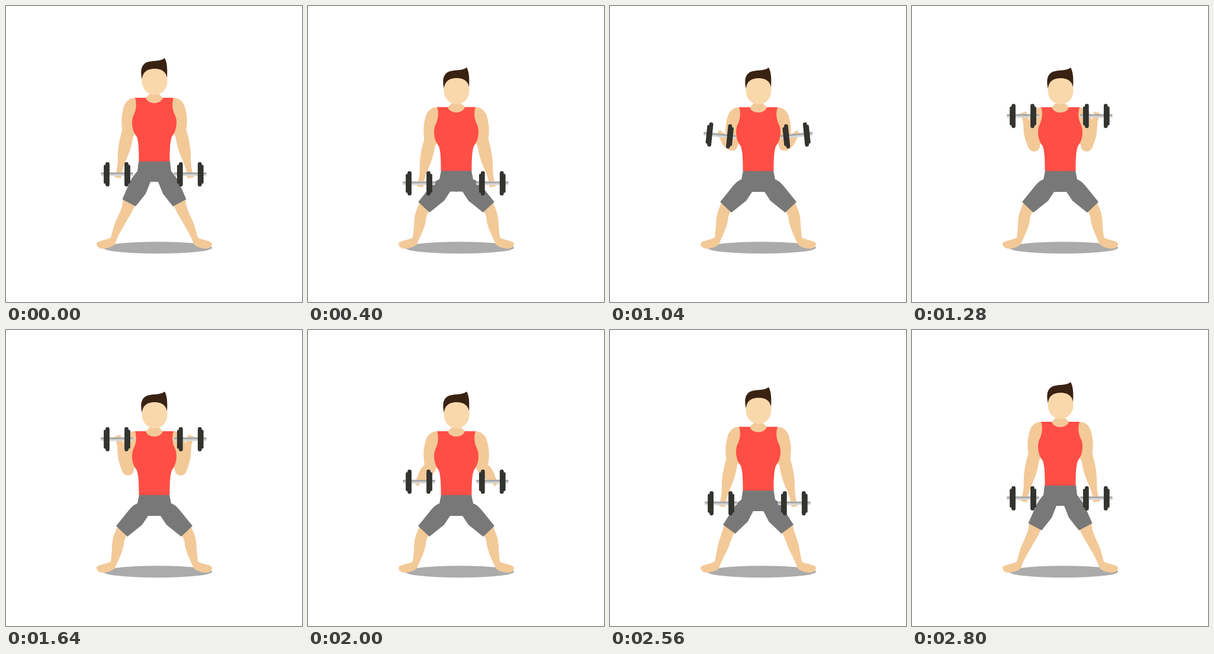
Write an HTML page with a canvas that moves like this. It is 500 px wide and 500 px high and loops after 3000 ms.

```html
<!DOCTYPE html>
<html lang="en">
<head>
<meta charset="utf-8">
<title>Squat and curl</title>
<style>
  html, body { margin: 0; width: 100%; height: 100%; overflow: hidden; background: #fff; }
  canvas { display: block; width: 500px; height: 500px; }
</style>
</head>
<body>
<canvas id="stage" width="500" height="500"></canvas>
<script>
const ctx = document.getElementById('stage').getContext('2d');
const LOOP = 3000, STEP = 40, SQUAT = 16;
const BODY_AXIS = 250.5, GRIP_AXIS = 249.4;
const SKIN = '#f3c998', FACE = '#f9d8ac', SHIRT = '#ff4e46', SHORTS = '#787878',
      HAIR = '#3a2213', PLATE = '#33332f', SHADOW = '#ababab';

// Left halves; the right halves are mirrored. Pairs are [standing, squatting].
const FOOT = 'L177 391 C170 396 153 396 153 402 C154 410 163 411 170 409 C180 407 184 403 185 400 ';
const LEG = [
  'M198 325 C197 345 188 355 183 370 ' + FOOT + 'C187 390 199 372 206 359 C212 350 214 345 218 336Z',
  'M189 331 C181 348 179 355 179 372 ' + FOOT + 'C188 392 196 378 199 363 C199 356 201 352 204 346Z'
];
const THIGH = [
  'M224 262 L222 279 C217 284 211 293 208 300 L196.500 326.500 L219 338.500 L236 317 L244 297 L252 297 L252 262Z',
  'M225 278 L222 293 C216 295 212 299 207 305 L186 331 L205 349 L230 329 L240 314 L252 314 L252 278Z'
];
const UPPER_ARM = 'M219 155 C206 155 200 164 198 174 C194 188 195 201 197 212 L216 219 L224 205 L224 155Z';
const TORSO = 'M218 155 C221 164 220 174 217 181 C214 187 213 191 213 196 C213 208 216 214 221 221 C224 230 224.500 242 224.500 262.800 L252 262.800 L252 155Z';
const NECK = 'M244 146 L243 148.500 L236 155 C238 161 244 164 251 164 L252 164 L252 146Z';
const HAIR_SHAPE = 'M229.500 123 C227 110 228 101 236 96 C245 91 259 95 268 88 C272 95 273 105 272 123Z';
const FACE_SHAPE = 'M229.500 127 C229.500 112 238 106 251 106 C264 106 272.500 112 272.500 127 C272.500 140 263 150 251 150 C239 150 229.500 140 229.500 127Z';

const clamp = x => Math.min(1, Math.max(0, x));
const lerp = (a, b, k) => a + (b - a) * k;
const span = (t, a, b) => clamp((t - a) / (b - a));
const smooth = x => x * x * (3 - 2 * x);

function morph([a, b], k) {
  const ends = b.match(/[\d.]+/g);
  let i = 0;
  return a.replace(/[\d.]+/g, n => lerp(+n, +ends[i++], k).toFixed(3));
}

function fill(path, color) {
  ctx.fillStyle = color;
  ctx.fill(new Path2D(path));
}

function ellipse(x, y, rx, ry, color) {
  ctx.fillStyle = color;
  ctx.beginPath();
  ctx.ellipse(x, y, rx, ry, 0, 0, 7);
  ctx.fill();
}

function shifted(dy, draw) {
  ctx.save();
  ctx.translate(0, dy);
  draw();
  ctx.restore();
}

function bothSides(axis, draw) {
  draw(false);
  ctx.save();
  ctx.translate(2 * axis, 0);
  ctx.scale(-1, 1);
  draw(true);
  ctx.restore();
}

function forearm(ex, ey, hx, hy) {
  const len = Math.hypot(hx - ex, hy - ey);
  ctx.save();
  ctx.translate(ex, ey);
  ctx.rotate(Math.atan2(hy - ey, hx - ex));
  const u = k => (k * len).toFixed(2);
  fill(`M0 -10 C${u(.3)} -11.500 ${u(.42)} -10 ${u(.6)} -7.200 C${u(.72)} -5 ${u(.85)} -4 ${u(1)} -5.500
        L${u(1)} 5.500 C${u(.85)} 4 ${u(.72)} 5 ${u(.6)} 7.200 C${u(.42)} 10 ${u(.3)} 11.500 0 10Z`, SKIN);
  ctx.restore();
  ellipse(ex, ey, 10, 10, SKIN);
}

function bar(x, y, w, h, r, color) {
  ctx.fillStyle = color;
  ctx.beginPath();
  ctx.roundRect(x, y, w, h, r);
  ctx.fill();
}

function dumbbell(x, y, tilt) {
  ctx.save();
  ctx.translate(x, y);
  ctx.rotate(tilt);
  bar(-27.5, -3, 55, 6, 2, '#d8d8d8');
  bar(-27.5, -3, 55, 3, 1.5, '#a8a8a8');
  for (const side of [-1, 1]) {
    bar(side * 20 - 2.4, -16, 4.8, 32, 2.2, PLATE);
    bar(side * 16 - 3.4, -20.5, 6.8, 41, 3.4, PLATE);
  }
  ctx.restore();
}

function draw(t) {
  const squat = smooth(span(t, 0, 440)) - smooth(span(t, 2340, 2800));
  const raise = smooth(span(t, 445, 1400));
  const curl = raise - span(t, 1620, 2220);
  const sink = SQUAT * squat;
  const swing = t < 1500 ? Math.sin(Math.PI * raise) ** 4 : 0;

  const gripY = lerp(284.3 + sink * .98, 180.5, curl);
  const handX = 189 - 8 * Math.sin(Math.PI * curl);
  const handY = gripY - 5.8 * Math.tanh((curl - .5) * 8);
  const elbowY = 212 + sink + 8 * Math.sqrt(Math.max(0, curl));

  ctx.clearRect(0, 0, 500, 500);
  ellipse(256, 408.3, 92, 10, SHADOW);

  bothSides(BODY_AXIS, () => {
    fill(morph(LEG, squat), SKIN);
    fill(morph(THIGH, squat), SHORTS);
    shifted(sink, () => fill(UPPER_ARM, SKIN));
    forearm(206, elbowY, handX, handY);
  });

  shifted(sink, () => {
    bothSides(BODY_AXIS, () => fill(TORSO, SHIRT));
    bothSides(BODY_AXIS, () => fill(NECK, SKIN));
    fill(HAIR_SHAPE, HAIR);
    fill(FACE_SHAPE, FACE);
  });

  bothSides(GRIP_AXIS, right =>
    dumbbell(187.5 - swing * (right ? 7.5 : 4.5), gripY, swing * .2));
}

function frame() {
  const t = performance.now() % LOOP;
  draw(Math.floor(t / STEP) * STEP);
  requestAnimationFrame(frame);
}
frame();
</script>
</body>
</html>
```
